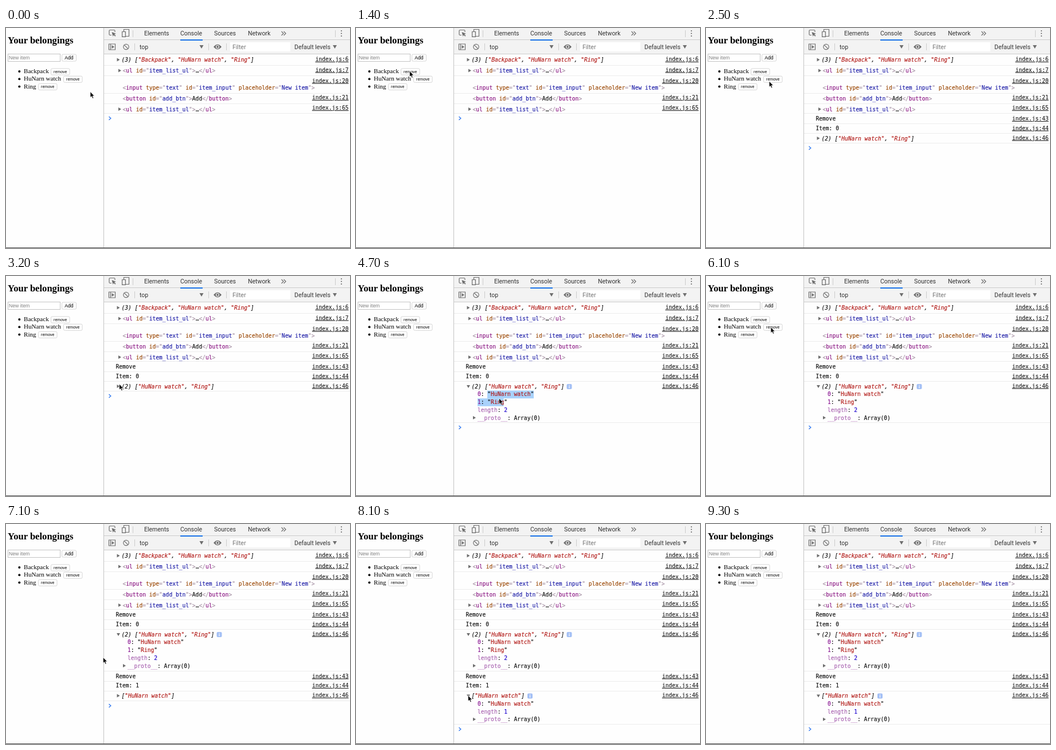
Animation, 600 px wide and 385 px high, one loop 9.4 s. Source, as an HTML page:

```html
<!DOCTYPE html>
<html lang="en">
<head>
<meta charset="utf-8">
<title>Your belongings</title>
<style>
  html, body { margin: 0; width: 100%; height: 100%; overflow: hidden; background: #fff; }
  svg { display: block; width: 600px; height: 385px; }
  text { white-space: pre; }
  .page { font: 11.1px "Liberation Serif", Times, serif; }
  .page .title { font-size: 16.6px; font-weight: bold; }
  .form { font-family: "Liberation Sans", Arial, sans-serif; }
  .ui { font: 10.5px Roboto, sans-serif; fill: #333; }
  .log { font: 9.6px "DejaVu Sans Mono", monospace; --c: #222; }
  .log text, .log tspan { fill: var(--c); stroke: var(--c); stroke-width: .15; }
  .i { font-style: italic; }
  .link { text-decoration: underline; text-anchor: end; }
  .t { --c: #881280; }
  .a { --c: #994500; }
  .v { --c: #1a1aa6; }
  .p { --c: #a894a6; }
  .s { --c: #b01512; }
  .n { --c: #1c00cf; }
  .k { --c: #881391; }
  .d { --c: #a862b0; }
  .b { --c: #111; }
  .line { fill: none; stroke: #ececec; }
  .bar { stroke: #ccc; fill: none; }
  .icon { fill: none; stroke: #6e6e6e; stroke-width: 1.2; }
  .fill { fill: #6e6e6e; }
</style>
</head>
<body>
<svg viewBox="0 0 600 385">
  <rect width="600" height="385" fill="#fefefe"/>

  <g class="page" id="page">
    <text class="title" x="3" y="27">Your belongings</text>
    <g class="form">
      <rect x="3.5" y="45.5" width="91" height="13" fill="#fff" stroke="#c4c4c4"/>
      <text x="5" y="55" font-size="8.7" fill="#808080">New item</text>
    </g>
  </g>

  <rect x="171" width="429" height="45" fill="#f3f3f3"/>
  <path class="bar" d="M171 20.5H600M171 45.5H600M221.5 4V16M574.5 4V16M224.5 27V39M353.5 27V39M384.5 27V39"/>
  <path d="M304 21H343" stroke="#1a73e8" stroke-width="2"/>
  <g class="icon">
    <path d="M184 12.5H181.5Q180 12.5 180 11V5Q180 3.5 181.5 3.5H188.5Q190 3.5 190 5V7"/>
    <path class="fill" stroke="none" d="M184.5 7L192 10L189 11L191.5 13.6L190.3 14.8L187.8 12.2L186.6 15Z"/>
    <path d="M205.5 6V2.5H214.5V14.5H209M202.6 6.5H208.4V15.4H202.6Z"/>
    <path d="M480.5 6L484 9.5L480.5 13M484.5 6L488 9.5L484.5 13"/>
    <path d="M179.5 28H190.5V38H179.5ZM182.5 28V38"/>
    <path class="fill" stroke="none" d="M184.5 30V36L189 33ZM337.5 30H344.5L341 36ZM570 30H577L573.5 36Z"/>
    <circle cx="209.5" cy="33" r="4.7"/>
    <path d="M206.2 29.7L212.8 36.3"/>
    <path class="fill" stroke="none" d="M362 33Q369 24.5 376 33Q369 41.5 362 33Z"/>
    <circle cx="369" cy="33" r="2.5" stroke="#f3f3f3"/>
    <path stroke-width="2.2" stroke-linecap="round" d="M585 5V5.01M585 9.5V9.51M585 14V14.01"/>
  </g>
  <rect x="391" y="25" width="105" height="16" fill="#fff"/>
  <g class="ui">
    <text x="241" y="13">Elements</text>
    <text x="304" y="13">Console</text>
    <text x="363" y="13">Sources</text>
    <text x="422" y="13">Network</text>
    <text x="233" y="37">top</text>
    <text x="395" y="37" fill="#757575">Filter</text>
    <text x="503" y="37">Default levels</text>
  </g>

  <g class="log">
    <g id="start"></g>
    <g id="logs1"></g>
    <g id="fold1"></g>
    <g id="open1"></g>
    <g id="logs2"></g>
    <g id="fold2"></g>
    <g id="open2"></g>
  </g>
  <g id="prompt">
    <path class="line" d="M171 -8.5H600"/>
    <path d="M179.5 -3L182.8 0L179.5 3" fill="none" stroke="#367cf1" stroke-width="1.4"/>
  </g>

  <path d="M170.5 0V385" stroke="#c4c4c4"/>
  <path d="M0 384.5H600" stroke="#555"/>
  <path id="cursor" d="M0 0V10L2.3 8L4 11.8L5.7 11L4.1 7.4H7.2Z" fill="#000" stroke="#fff" stroke-width=".7"/>
</svg>

<script>
const LOOP = 9400, STEP = 100;
const $ = id => document.getElementById(id);
const add = (id, ...parts) => { $(id).innerHTML += parts.join(''); };

// {cText} wraps Text in a span of class c
const text = (x, y, s, cls = '') => {
  const body = s.replace(/</g, '&lt;').replace(/\{(\w)([^}]*)\}/g, '<tspan class="$1">$2</tspan>');
  return `<text x="${x}" y="${y}" class="${cls}">${body}</text>`;
};
const link = (y, n) => text(597.5, y, 'index.js:' + n, 'link');
const line = y => `<path class="line" d="M171 ${y}.5H600"/>`;
const right = (x, y) => `<path class="fill" d="M${x - 2} ${y - 3}V${y + 3}L${x + 3} ${y}Z"/>`;
const down = (x, y) => `<path class="fill" d="M${x - 3} ${y - 2}H${x + 3}L${x} ${y + 3}Z"/>`;
const info = (x, y) => `<rect x="${x - 4.5}" y="${y - 4.5}" width="9" height="9" rx="2" fill="#a4c0f5"/>
  <path d="M${x} ${y - 2.8}V${y - 1.6}M${x} ${y - .7}V${y + 2.8}" stroke="#fff" stroke-width="1.2"/>`;

const button = (x, y, w, h, label, size) => `<g class="form">
  <rect x="${x}" y="${y}" width="${w}" height="${h}" rx="2" fill="#fff" stroke="#d2d2d2" stroke-width=".9"/>
  <text x="${x + w / 2}" y="${y + h / 2 + size * .34}" font-size="${size}" text-anchor="middle">${label}</text></g>`;

const watch = 'HuNarn watch';
add('page', button(97.5, 46, 25, 12, 'Add', 8.6));
[['Backpack', 78.5], [watch, 100.5], ['Ring', 56.5]].forEach(([name, x], i) => {
  const y = 76 + i * 13.2;
  add('page', `<circle cx="23.3" cy="${y}" r="2"/>`, text(31, y + 3.2, name),
    button(x, y - 5, 32.5, 11, 'remove', 7));
});

const array = (y, names, count = '') =>
  text(201.5, y, `${count}[${names.map(n => `{s"${n}"}`).join(', ')}]`, 'i b');
const attr = (name, value) => ` {a${name}}{p="}{v${value}}{p"}`;
const list = y => right(198, y - 3.5) +
  text(203.5, y, `{p<}{tul}${attr('id', 'item_list_ul')}{p>}…{p</}{tul}{p>}`);

add('start',
  right(195.5, 55.5), array(59, ['Backpack', watch, 'Ring'], '(3) '), link(58, 6), line(65),
  list(78), link(76.5, 7), line(83),
  text(203.5, 107.5, `{p<}{tinput}${attr('type', 'text')}${attr('id', 'item_input')}${attr('placeholder', 'New item')}{p>}`),
  link(95.5, 20), line(114),
  text(203.5, 126.5, `{p<}{tbutton}${attr('id', 'add_btn')}{p>}{bAdd}{p</}{tbutton}{p>}`),
  link(125, 21), line(132),
  list(145.5), link(143, 65));

// One removal: two messages, then an array that can be unfolded
function removal(n, y, index, names, count, infoX) {
  const row = y + 34.5;
  add('logs' + n,
    line(Math.round(y - 12.6)), text(191.5, y, 'Remove', 'b'), link(y, 43),
    line(Math.round(y + 5)), text(191.5, y + 16.5, 'Item: ' + index, 'b'), link(y + 16.5, 44),
    line(Math.round(y + 22)), array(row, names, count), link(row - 1, 46));
  add('fold' + n, right(195.5, row - 3.5));
  const tail = row + 13.8 * names.length;
  add('open' + n,
    down(196, row - 3.5), info(infoX, row - 3),
    ...names.map((s, i) => text(212, row + 13.8 * (i + 1), `{k${i}}: "{s${s}}"`, 'b')),
    text(212, tail + 13.8, `{dlength}: {n${names.length}}`, 'b'),
    right(206, tail + 24), text(212, tail + 27.6, '{d__proto__}: Array(0)', 'b'));
}
removal(1, 162, 0, [watch, 'Ring'], '(2) ', 372);
removal(2, 269.5, 1, [watch], '', 303.5);

const select = (x, y) => `<rect class="mark" x="${x}" y="${y}" height="13.7" fill="#a8d1fb"/>`;
$('open1').innerHTML = select(229, 200.5) + select(212, 214.2) + $('open1').innerHTML;
const marks = document.querySelectorAll('.mark');

// Cursor stops: time, x, y
const path = [
  [0, 147, 111.5], [300, 147, 111.5], [1200, 93.5, 75.5], [2300, 93.5, 75.5],
  [3100, 200, 188.5], [3300, 195, 189.5], [3700, 195, 189.5], [4100, 230, 203],
  [4700, 249.5, 214], [5300, 258, 217], [6000, 113, 89.5], [6600, 113, 89.5],
  [7400, 195.5, 300], [8300, 195.5, 300], [9000, -12, -16], [9400, -12, -16]
];
const LOGS1 = 2200, OPEN1 = 3500, LOGS2 = 6500, OPEN2 = 7600;
const ease = u => u * u * (3 - 2 * u);

function cursorAt(t) {
  const i = path.findIndex((p, k) => k && t < p[0]);
  const [t0, x0, y0] = path[i - 1], [t1, x1, y1] = path[i];
  const u = ease((t - t0) / (t1 - t0));
  return [x0 + (x1 - x0) * u, y0 + (y1 - y0) * u];
}

const show = (id, on) => $(id).setAttribute('display', on ? 'inline' : 'none');

function draw(t) {
  show('logs1', t >= LOGS1);
  show('fold1', t >= LOGS1 && t < OPEN1);
  show('open1', t >= OPEN1);
  show('logs2', t >= LOGS2);
  show('fold2', t >= LOGS2 && t < OPEN2);
  show('open2', t >= OPEN2);

  const y = t < LOGS1 ? 158 : t < OPEN1 ? 210 : t < LOGS2 ? 265 : t < OPEN2 ? 318 : 359;
  $('prompt').setAttribute('transform', `translate(0 ${y})`);

  const [cx, cy] = cursorAt(t);
  $('cursor').setAttribute('transform', `translate(${cx} ${cy})`);

  const dragging = t > 4100 && t < 5400, second = cy > 210;
  marks[0].setAttribute('width', !dragging ? 0 : second ? 81 : Math.max(0, cx - 229));
  marks[1].setAttribute('width', dragging && second ? Math.max(0, cx - 204) : 0);
}

const origin = performance.now();
function tick() {
  const t = (performance.now() - origin) % LOOP;
  draw(Math.floor(t / STEP) * STEP);
  requestAnimationFrame(tick);
}
tick();
</script>
</body>
</html>
```
